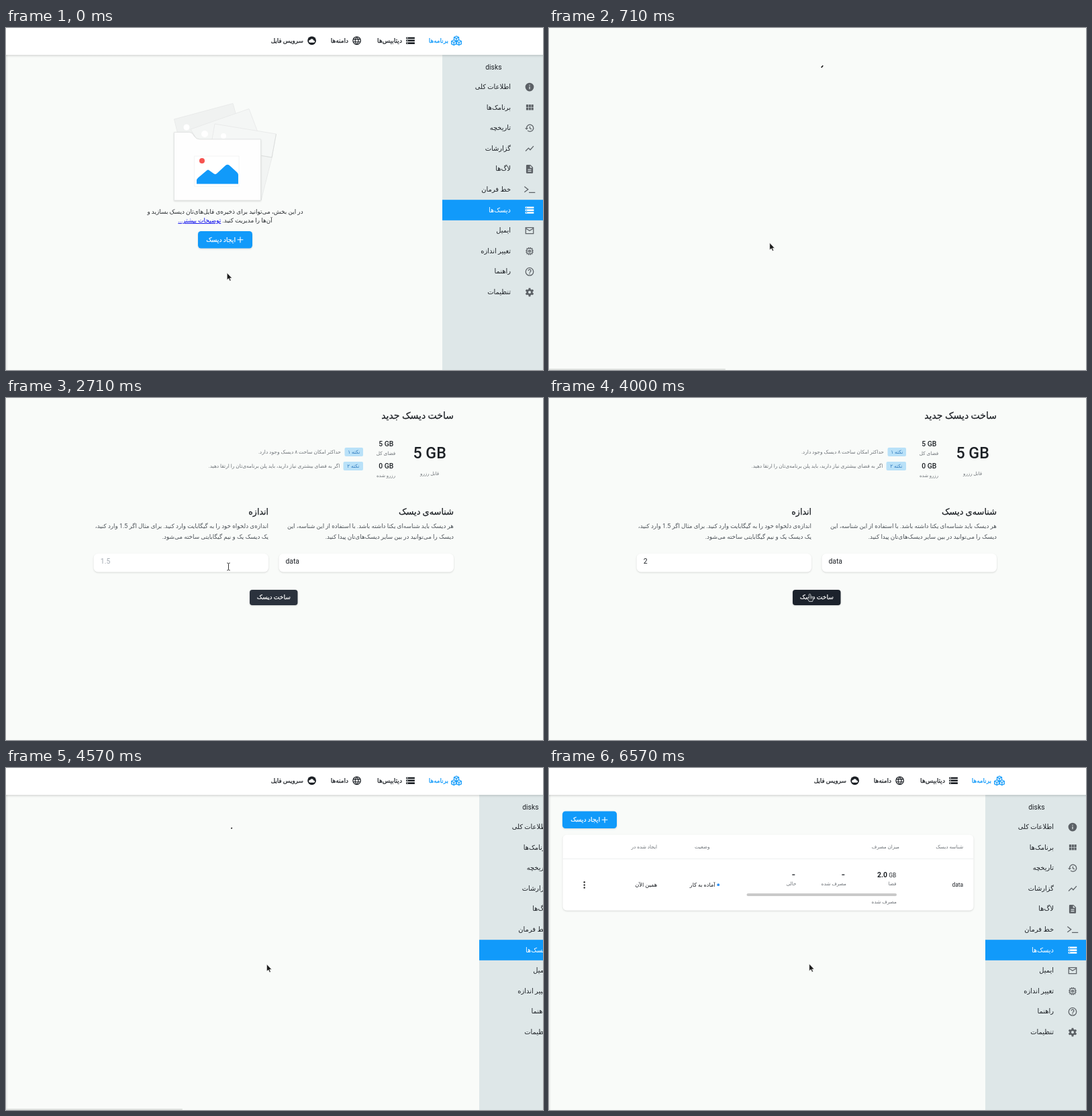
Recreate the animation shown at these times as an HTML page. Size 800x510 px, loop 7.28 s.

```html
<!DOCTYPE html>
<html lang="fa">
<head>
<meta charset="utf-8">
<title>ساخت دیسک</title>
<style>
html, body { margin: 0; width: 100%; height: 100%; overflow: hidden; background: #f9fbf9; }
svg { display: block; width: 800px; height: 510px; }
text { font-family: Roboto, "DejaVu Sans", sans-serif; }
.fa { direction: rtl; }
.mid { text-anchor: middle; }
.med { stroke: currentColor; stroke-width: .25px; }
.card { filter: drop-shadow(0 1px 1.2px rgba(0, 0, 0, .14)); }
</style>
</head>
<body>
<svg id="stage" viewBox="0 0 800 510" xmlns="http://www.w3.org/2000/svg"></svg>
<script>
const LOOP = 7280;
const BLUE = '#119afa', INK = '#1d2126', GREY = '#70757a', ICON = '#5c6166';

// Drawing helpers
const fa = (x, y, size, s, fill = INK, cls = '') =>
  `<text class="fa ${cls}" x="${x}" y="${y}" font-size="${size}" style="fill:${fill};color:${fill}">${s}</text>`;
const la = (x, y, size, s, fill = INK, weight = 400) =>
  `<text x="${x}" y="${y}" font-size="${size}" font-weight="${weight}" fill="${fill}">${s}</text>`;
const box = (x, y, w, h, r, fill, cls = '') =>
  `<rect class="${cls}" x="${x}" y="${y}" width="${w}" height="${h}" rx="${r}" fill="${fill}"/>`;
const dot = (x, y, r, fill) => `<circle cx="${x}" cy="${y}" r="${r}" fill="${fill}"/>`;
const line = (d, color, w, fill = 'none') =>
  `<path d="${d}" fill="${fill}" stroke="${color}" stroke-width="${w}"/>`;
const icon = (name, x, y, color, size = 15.3) =>
  `<g transform="translate(${x - size / 2} ${y - size / 2}) scale(${size / 24})" color="${color}" fill="currentColor">${icons[name]}</g>`;
const group = (id, body) => `<g id="${id}">${body}</g>`;

// Icons on a 24-unit grid
const stroke = (d, w = 2) => line(d, 'currentColor', w);
const ring = '<circle cx="12" cy="12" r="9" fill="none" stroke="currentColor" stroke-width="2"/>';
const icons = {
  info: '<path fill-rule="evenodd" d="M12 2a10 10 0 1 0 0 20 10 10 0 1 0 0-20zM11 7h2v2h-2zM11 11h2v6h-2z"/>',
  modules: [4, 10, 16].map(x => box(x, 5, 5, 6, 0, 'currentColor') + box(x, 12, 5, 6, 0, 'currentColor')).join(''),
  history: stroke('M5 12a8 8 0 1 1 2.4 5.7M12.7 8v4.6l3.8 2.3') + '<path d="M1 12h8l-4 4z"/>',
  chart: stroke('M2.7 17.7 9.5 11l4 4 7.8-8.8'),
  file: '<path fill-rule="evenodd" d="M6 2h8l6 6v12a2 2 0 0 1-2 2H6a2 2 0 0 1-2-2V4a2 2 0 0 1 2-2zM13 3.5V9h5.5zM8 12h8v2H8zM8 16h8v2H8z"/>',
  shell: stroke('M0 5l8.5 6.5L0 18M10.5 19H25'),
  storage: '<path fill-rule="evenodd" d="' + [4, 10, 16].map(y => `M2 ${y}h20v4H2zM4 ${y + 1}h2v2H4z`).join('') + '"/>',
  mail: stroke('M3 5h18v14H3zM3 6.7l9 5.5 9-5.5'),
  chip: stroke('M6 6h12v12H6zM10 10h4v4h-4zM10 3v3M14 3v3M10 18v3M14 18v3M3 10h3M3 14h3M18 10h3M18 14h3'),
  help: ring + stroke('M9 10a3 3 0 1 1 4.6 2.5Q12 13.6 12 15M12 16v2'),
  gear: '<circle cx="12" cy="12" r="5.2" fill="none" stroke="currentColor" stroke-width="4"/>' +
    [0, 60, 120].map(a => `<path transform="rotate(${a} 12 12)" d="M10 2h4l.8 5H9.2zM10 22h4l.8-5H9.2z"/>`).join(''),
  globe: ring + stroke('M3.5 9h17M3.5 15h17M12 3c-5 6-5 12 0 18M12 3c5 6 5 12 0 18', 1.8),
  cloud: dot(12, 12, 10, 'currentColor') + '<path fill="#fff" d="M8 16.5a3 3 0 0 1 0-6h.3a4 4 0 0 1 7.7 1h.5a2.5 2.5 0 0 1 0 5z"/>',
  plus: stroke('M12 4v16M4 12h16')
};

const cube = (x, y) => `<g transform="translate(${x} ${y})">` +
  line('M0-4l3.6 1.8v4.2L0 3.9-3.6 2v-4.2zM-3.6-2.2 0-.4l3.6-1.8M0-.4v4.3', BLUE, 1.1, '#d9effe') + '</g>';

function header() {
  return box(0, 0, 800, 40, 0, '#fff') + box(0, 40, 800, 4, 0, 'url(#fall)') +
    cube(671, 16) + cube(667.2, 21.8) + cube(674.8, 21.8) +
    fa(659, 21.5, 8.8, 'برنامه&zwnj;ها', BLUE, 'med') +
    icon('storage', 602.5, 18.8, INK) + fa(590, 21.5, 9.2, 'دیتابیس&zwnj;ها', INK, 'med') +
    icon('globe', 522.6, 18.8, INK) + fa(510, 21.5, 9, 'دامنه&zwnj;ها', INK, 'med') +
    icon('cloud', 455.6, 18.8, INK) + fa(443, 21.5, 8.8, 'سرویس فایل', INK, 'med');
}

const menu = [
  ['info', 'اطلاعات کلی'], ['modules', 'برنامک&zwnj;ها'], ['history', 'تاریخچه'], ['chart', 'گزارشات'],
  ['file', 'لاگ&zwnj;ها'], ['shell', 'خط فرمان'], ['storage', 'دیسک&zwnj;ها'], ['mail', 'ایمیل'],
  ['chip', 'تغییر اندازه'], ['help', 'راهنما'], ['gear', 'تنظیمات']
];
function sidebar() {
  const rows = menu.map(([name, label], i) => {
    const y = 88 + i * 30.6, on = name === 'storage';
    return (on ? box(650, 256.2, 150, 30.6, 0, BLUE) : '') +
      icon(name, 780, y, on ? '#fff' : ICON) + fa(752, y + 3, 9.9, label, on ? '#fff' : INK);
  });
  return box(650, 40, 150, 470, 0, '#dee7e8') + la(714.3, 61.5, 10.3, 'disks') + rows.join('');
}

function addButton(x, y) {
  return box(x, y, 81, 25.5, 4.5, BLUE, 'card') + icon('plus', x + 63, y + 12.8, '#fff', 13) +
    fa(x + 56, y + 15.8, 9.3, 'ایجاد دیسک', '#fff', 'med');
}

function emptyPage() {
  const sheet = (d, fill) => line(d, '#e6e8e7', .8, fill);
  const art = sheet('M250.5 136 338 112.5l7 25L260 175z', '#f0f2f1') + dot(269, 148, 4.5, '#fff') +
    sheet('M275 151 362 120.5l15 40-85 20z', '#f4f6f5') + dot(296, 158, 5, '#fff') +
    sheet('M370 160l27 30-17 67z', '#f2f4f3') +
    sheet('M311 143l91.5 15-6.5 35-91-16z', '#f5f7f6') + dot(324, 161, 4, '#fff') +
    line('M402.5 158l-6.5 35-15-2.5', '#d9dbda', .8) +
    '<path class="card" d="M250.5 155.5h22q4 0 6 3l2 3q3 4.5 8 4.5h91v91h-129z" fill="#fefefe" stroke="#dfe1e0" stroke-width=".8"/>' +
    line('M280.5 191h66.5v45h-66.5z', '#f0f1f1', .8, '#fff') + dot(292, 198, 4, '#f65350') +
    `<path d="M284 232.5v-5q0-2 2-4l13-11q2-2 4 0l7 5q2 1 4-.5l13-12q3-2.5 6 0l11 10q2 2 2 4v13.500z" fill="${BLUE}"/>`;
  return art +
    fa(326.5, 277, 8.9, 'در این بخش، می&zwnj;توانید برای ذخیره&zwnj;ی فایل&zwnj;های&zwnj;تان دیسک بسازید و', '#2b2f33', 'mid') +
    fa(326.5, 290, 8.9, 'آن&zwnj;ها را مدیریت کنید. <tspan style="fill:#00e" text-decoration="underline">توضیحات بیشتر...</tspan>', '#2b2f33', 'mid') +
    addButton(286, 303);
}

function tablePage() {
  const small = (x, y, s) => fa(x, y, 7.3, s, GREY);
  return addButton(20, 64.5) + box(20.5, 99.5, 612, 113, 6, '#fff', 'card') +
    box(20.5, 135, 612, 1, 0, '#eef0f0') +
    small(617, 120, 'شناسه دیسک') + small(522, 120, 'میزان مصرف') +
    small(239.5, 120, 'وضعیت') + small(161, 120, 'ایجاد شده در') +
    la(600.5, 177, 8.4, 'data') +
    la(489, 163, 10.4, '2.0', INK, 700) + la(506.3, 163, 8.4, 'GB') + small(517.5, 175, 'فضا') +
    box(436.3, 158.6, 4, 1.3, 0, INK) + small(443, 175, 'مصرف شده') +
    box(362.3, 158.6, 4, 1.3, 0, INK) + small(368.5, 175, 'خالی') +
    box(294.5, 187, 223.5, 4, 2, '#c9c9c9') + small(518, 202, 'مصرف شده') +
    dot(252.2, 174.2, 1.9, '#2b8ff5') + fa(247.5, 177, 8.1, 'آماده به کار') +
    fa(161, 177, 8.2, 'همین الآن') +
    [170.2, 174.4, 178.6].map(y => dot(52.7, y, 1.25, '#333')).join('');
}

function formPage() {
  const tag = (x, y, s) => box(x, y, 532 - x, 13, 2, '#b9e1f8') +
    fa((x + 532) / 2, y + 9, 7.3, s, '#2c78bd', 'mid');
  const para = (x, y, s) => fa(x, y, 8.8, s, '#4c5258');
  return fa(667, 30.5, 14, 'ساخت دیسک جدید', INK, 'med') +
    la(606.4, 90.3, 23.2, '5 GB', INK, 500) + fa(631, 115, 7, 'قابل رزرو', GREY, 'mid') +
    la(555.3, 72, 10.4, '5 GB', INK, 500) + fa(566, 85, 7.3, 'فضای کل', GREY, 'mid') +
    la(555.3, 105, 10.4, '0 GB', INK, 500) + fa(566, 118, 6.9, 'رزرو شده', GREY, 'mid') +
    tag(504.5, 74, 'نکته ۱') + fa(499, 83, 7.5, 'حداکثر امکان ساخت ۸ دیسک وجود دارد.', GREY) +
    tag(502.5, 95, 'نکته ۲') + fa(497.5, 104, 7.5, 'اگر به فضای بیشتری نیاز دارید، باید پلن برنامه&zwnj;ی&zwnj;تان را ارتقا دهید.', GREY) +
    fa(667, 174, 12.9, 'شناسه&zwnj;ی دیسک', INK, 'med') +
    para(667, 194, 'هر دیسک باید شناسه&zwnj;ای یکتا داشته باشد. با استفاده از این شناسه، این') +
    para(667, 210, 'دیسک را می&zwnj;توانید در بین سایر دیسک&zwnj;های&zwnj;تان پیدا کنید.') +
    fa(391, 174, 12.6, 'اندازه', INK, 'med') +
    para(391, 194, 'اندازه&zwnj;ی دلخواه خود را به گیگابایت وارد کنید. برای مثال اگر 1.5 وارد کنید،') +
    para(391, 210, 'یک دیسک یک و نیم گیگابایتی ساخته می&zwnj;شود.') +
    box(406.5, 232, 260.5, 27.5, 6.5, '#fff', 'card') + box(130.5, 232, 260.5, 27.5, 6.5, '#fff', 'card') +
    group('fields', '') +
    '<rect id="submit" class="card" x="363" y="286" width="71.5" height="23" rx="4"/>' +
    fa(398.8, 299.8, 9.1, 'ساخت دیسک', '#fff', 'mid med');
}

const pointers = {
  arrow: '<path d="M0 0V10.3L2.5 8.2 4.2 12 5.8 11.3 4.2 7.7H7.3Z" fill="#1b1b1b" stroke="#fff" stroke-width=".5"/>',
  beam: line('M-2.3-5.5Q0-5.5 0-4V4Q0 5.5-2.3 5.5M2.3-5.5Q0-5.5 0-4M2.3 5.5Q0 5.5 0 4', '#333', 1),
  hand: line('M0 0q-1.3 0-1.3 1.2v5l-1.3-1q-1.3 0-1 1.2l2.6 4.8h5l1.2-3.5V4.9q-.5-1.2-1.6-.7-.4-1-1.5-.5l-.8-.2V1.2Q1.3 0 0 0zM1.2 4v3M3 4.300v2.7', '#c8ccd1', .9, '#2a2f36')
};

const stage = document.getElementById('stage');
stage.innerHTML = `<defs>
  <linearGradient id="fall" x2="0" y2="1"><stop stop-color="#000" stop-opacity=".13"/><stop offset="1" stop-color="#000" stop-opacity="0"/></linearGradient>
  <linearGradient id="edge"><stop stop-color="#e9ebea"/><stop offset="1" stop-color="#f6f8f6"/></linearGradient></defs>` +
  box(0, 0, 800, 510, 0, '#f9fbf9') +
  group('shell', box(0, 40, 3, 470, 0, 'url(#edge)') + group('side', sidebar()) + header()) +
  group('empty', emptyPage()) + group('table', tablePage()) + group('form', formPage()) +
  group('extra', '') + group('pointer', '');

const el = id => document.getElementById(id);
const show = (id, on) => el(id).setAttribute('display', on ? 'inline' : 'none');
const mark = 'M405.7 59 408.2 56', speck = 'M335.5 90.5 336.7 89';

// Each step holds until the next and keeps what it does not mention
const steps = [
  [0, { page: 'empty', shell: true, shift: 0, cur: ['arrow', 329.3, 365.3], data: '', size: '', caret: 0, btn: '#2b323d', load: '', status: false }],
  [140, { cur: ['arrow', 329.3, 351] }],
  [290, { cur: ['hand', 330, 321] }],
  [430, { cur: ['hand', 330, 320] }],
  [570, { page: '', shift: 55, load: speck, cur: ['arrow', 328.8, 320.5] }],
  [710, { shell: false, load: mark, status: true }],
  [860, { page: 'form', load: '', status: false }],
  [1000, { cur: ['arrow', 340, 313] }],
  [1140, { cur: ['arrow', 365.5, 296] }],
  [1290, { cur: ['arrow', 404, 274] }],
  [1430, { cur: ['beam', 443, 253] }],
  [1570, { cur: ['beam', 456, 251], caret: 656 }],
  [1860, { data: 'd', caret: 422.8 }],
  [2000, { data: 'da', caret: 428.4 }],
  [2140, { data: 'dat', caret: 431.8 }],
  [2290, { data: 'data', caret: 437.5 }],
  [2430, { caret: 0, cur: ['arrow', 399, 275.5] }],
  [2570, { cur: ['beam', 352, 254] }],
  [2710, { cur: ['beam', 331.5, 251.5] }],
  [3140, { caret: 140.8 }],
  [3290, { size: '2', caret: 147.5 }],
  [3430, { caret: 0, cur: ['beam', 337, 254] }],
  [3570, { cur: ['arrow', 356, 270] }],
  [3710, { cur: ['arrow', 377, 285] }],
  [3860, { cur: ['hand', 388, 292], btn: '#1c222c' }],
  [4000, { cur: ['hand', 388.5, 292.3] }],
  [4140, { cur: ['hand', 388.5, 293] }],
  [4290, { page: '', load: mark, cur: ['arrow', 388.5, 292.8] }],
  [4430, { shell: true, shift: 115, load: speck }],
  [4570, { shift: 55, status: true }],
  [4710, { shift: 16, status: false }],
  [4860, { shift: 0 }],
  [5000, { page: 'table', load: '' }],
  [6000, { cur: ['arrow', 388, 292.5] }],
  [6570, { cur: ['arrow', 387.7, 292.2] }]
];

function draw(s) {
  ['empty', 'table', 'form'].forEach(id => show(id, s.page === id));
  show('shell', s.shell);
  el('side').setAttribute('transform', `translate(${s.shift} 0)`);
  el('submit').setAttribute('fill', s.btn);
  el('fields').innerHTML = la(416.4, 247, 10.4, s.data) +
    la(140.8, 247, 10.4, s.size || '1.5', s.size ? INK : '#a3aab2') +
    (s.caret ? box(s.caret, 238, .8, 12, 0, INK) : '');
  el('extra').innerHTML = (s.load ? line(s.load, '#111', 1.6) : '') +
    (s.status ? box(0, 508, 263, 2, 1, '#dfe2df') : '');
  const [kind, x, y] = s.cur;
  el('pointer').innerHTML = pointers[kind];
  el('pointer').setAttribute('transform', `translate(${x} ${y})`);
}

const start = performance.now();
let shown = 0;
function tick() {
  const t = (performance.now() - start) % LOOP;
  const count = steps.filter(([at]) => at <= t).length;
  if (count !== shown) {
    draw(Object.assign({}, ...steps.slice(0, count).map(step => step[1])));
    shown = count;
  }
  requestAnimationFrame(tick);
}
tick();
</script>
</body>
</html>
```
